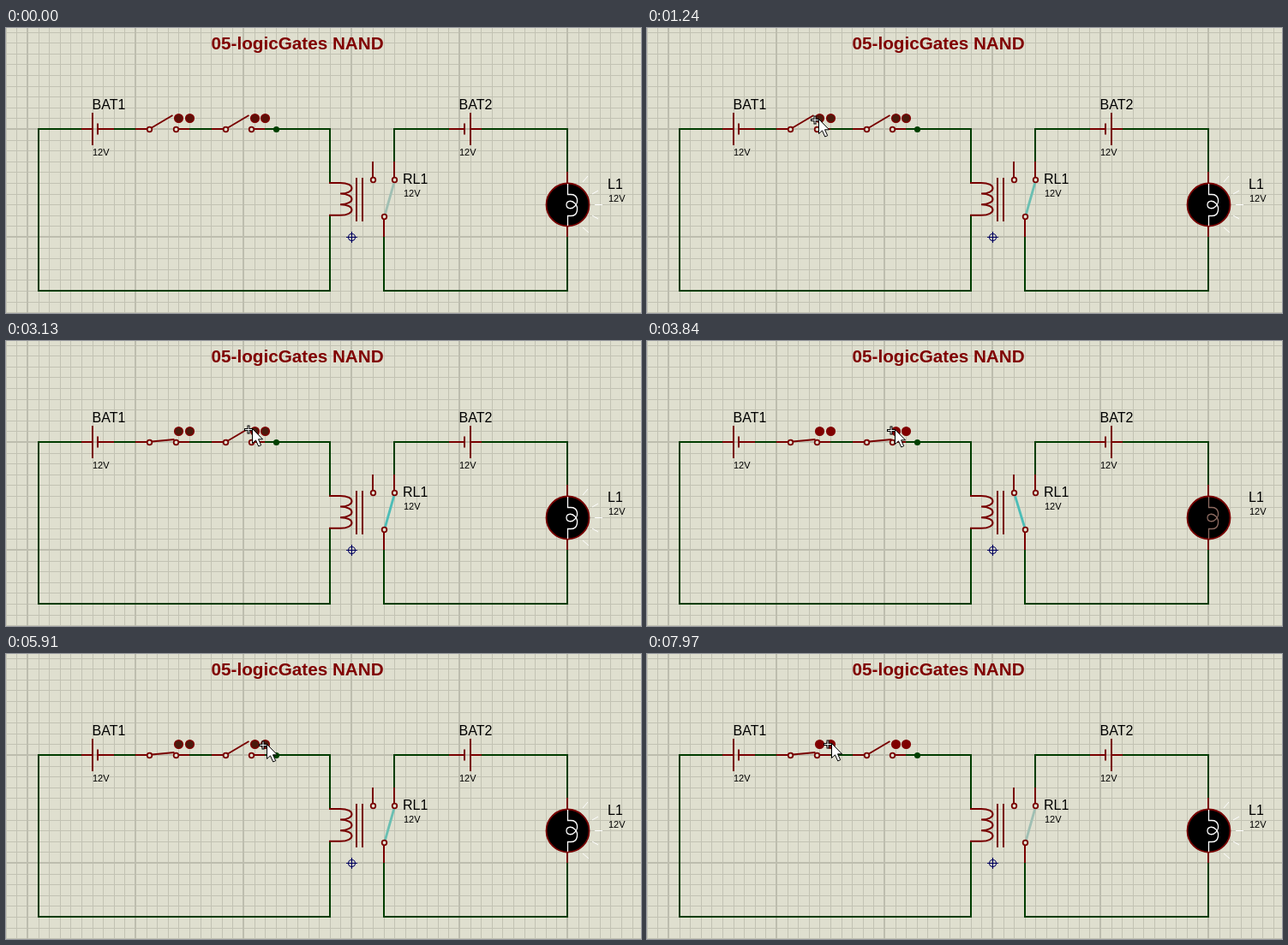
Write an HTML page that moves like this. It is 741 px wide and 333 px high and loops after 8000 ms.

```html
<!DOCTYPE html>
<html lang="en">
<head>
<meta charset="utf-8">
<title>NAND relay circuit</title>
<style>
  html, body { margin: 0; width: 100%; height: 100%; overflow: hidden; background: #dfdfcf; }
  svg { display: block; width: 741px; height: 333px; }
  text { font: 16px "Liberation Sans", Arial, sans-serif; fill: #000; }
  .small { font-size: 11px; }
  .title { font-size: 20.7px; font-weight: bold; fill: #800000; }
  .line { fill: none; stroke-width: 2; }
  .wire { stroke: #003c00; }
  .part { stroke: #780000; }
  .terminal { fill: #dfdfcf; stroke: #780000; stroke-width: 1.8; }
</style>
</head>
<body>
<svg viewBox="0 0 741 333">
  <path id="minorGrid" stroke="#c2c2b3" shape-rendering="crispEdges"/>
  <path id="majorGrid" stroke="#bdbdae" stroke-width="2" shape-rendering="crispEdges" transform="translate(-.5 -.5)"/>

  <text class="title" x="239.5" y="25">05-logicGates NAND</text>
  <text x="100.5" y="95">BAT1</text>
  <text x="528.5" y="95">BAT2</text>
  <text x="463" y="182">RL1</text>
  <text x="702" y="188">L1</text>
  <text class="small" x="101" y="149">12V</text>
  <text class="small" x="529" y="149">12V</text>
  <text class="small" x="464" y="197">12V</text>
  <text class="small" x="703" y="203">12V</text>

  <path class="line wire" d="M88 118H38V307H378V219M126 118H151M214 118H240M302 118H378V181
    M453 156V118H517M555 118H655V168M655 244V307H441V244"/>
  <circle cx="315.5" cy="118.5" r="3.6" fill="#004000"/>

  <path class="line part" d="M88 118H101M101 99V137M107 111.5V124.5M107 118H126
    M517 118H535M535 111.5V124.5M542 99V137M542 118H555"/>
  <path class="line part" d="M151 118H165M201 118H214M240 118H254M289 118H302"/>
  <circle class="terminal" cx="167.5" cy="118.5" r="2.8"/>
  <circle class="terminal" cx="198.5" cy="118.5" r="2.8"/>
  <circle class="terminal" cx="256.5" cy="118.5" r="2.8"/>
  <circle class="terminal" cx="286.5" cy="118.5" r="2.8"/>
  <path id="lever1" class="line part"/>
  <path id="lever2" class="line part"/>
  <g id="buttons" stroke="#800000" stroke-width="1.5">
    <circle cx="201.5" cy="105.5" r="4.8"/>
    <circle cx="214.5" cy="105.5" r="4.8"/>
    <circle cx="290.5" cy="105.5" r="4.8"/>
    <circle cx="302.5" cy="105.5" r="4.8"/>
  </g>

  <path class="line part" d="M377 181H390c18 0 18 12.6 0 12.6c18 0 18 12.6 0 12.6c18 0 18 12.6 0 12.6H377
    M409 175V226M416 175V226M428 156V174M453 156V174M441 223V244"/>
  <path id="arm" fill="none" stroke-width="2.8"/>
  <circle class="terminal" cx="428.5" cy="177.5" r="2.8"/>
  <circle class="terminal" cx="453.5" cy="177.5" r="2.8"/>
  <circle class="terminal" cx="441.5" cy="220.5" r="2.8"/>
  <g fill="none" stroke="#000060" stroke-width="1.1">
    <circle cx="403.5" cy="244.5" r="4"/>
    <path d="M397 244.5H410M403.5 238V251"/>
  </g>

  <path class="line part" d="M655 168V182M655 231V244"/>
  <circle class="part" cx="655.5" cy="206.5" r="25" stroke-width="1.8"/>
  <path id="filament" fill="none" stroke-width="1.3" d="M655.5 182V194.5H659C668 194.5 668 204 664 208
    C660 212.5 654 211 654 206.5C654 202 660 200.5 664 205C668 209 668 219.5 659 219.5H655.5V231"/>
  <path id="rays" stroke="#fff" stroke-width="1"
    d="M673 180L679 173M684 194L691 190M687 206.5H696M684 219L691 223M673 233L680 239"/>

  <g id="arrow">
    <path d="M-9.5 1H.5M-4.5-4V6" stroke="#000" stroke-width="3"/>
    <path d="M-8.5 1H-.5M-4.5-3V5" stroke="#fff"/>
    <path d="M0 0V17L4 13.4L7.2 20.5L10.2 19.2L7 12.3H12Z" fill="#fff" stroke="#000"/>
  </g>
  <path id="hand" fill="#fff" stroke="#000" stroke-width="1.1" d="M-2 1Q0-1 2 1V8Q4 6.5 5.5 8.5Q7.5 7.5 8.5 9.5
    Q10.5 9 10.5 11.5V17L8.5 20V23.5H-1V20L-5.5 13Q-6.5 10-4.5 10.5L-2 13Z"/>
</svg>
<script>
const LOOP = 8000;
const $ = id => document.getElementById(id);

// Grid: every tenth line is heavier, counted from the origin marker.
const CELL = 12.6, ORIGIN = { x: 403.45, y: 244.5 };
const gridPaths = { minorGrid: "", majorGrid: "" };
const addGrid = (origin, size, draw) => {
  for (let i = -Math.floor(origin / CELL); origin + i * CELL < size; i++)
    gridPaths[i % 10 ? "minorGrid" : "majorGrid"] += draw(Math.floor(origin + i * CELL) + 0.5);
};
addGrid(ORIGIN.x, 741, x => `M${x} 0V333`);
addGrid(ORIGIN.y, 333, y => `M0 ${y}H741`);
for (const id in gridPaths) $(id).setAttribute("d", gridPaths[id]);

// Pointer position: [time, x, y]
const pointerPath = [
  [130, 262, 333], [520, 222, 190], [910, 203, 112], [1240, 200, 106], [1920, 200, 106],
  [2300, 284, 100], [2380, 287, 102], [3130, 287, 102], [3590, 289, 103], [4380, 289, 103],
  [4540, 299, 104], [5410, 302, 104], [5910, 304, 105], [6170, 300, 122], [6510, 296, 122],
  [6840, 272, 114], [7060, 264, 106], [7150, 264, 106], [7800, 217, 106], [7970, 215, 104]
];
const buttonShades = [[0, "#5a1008"], [130, "#4a1a0c"], [3840, "#800000"], [4910, "#4a1a0c"], [6250, "#800000"]];
const armShades = [[0, "#a0bfb3"], [130, "#6abfb2"], [1920, "#4cbdb7"], [4910, "#6abfb2"], [6250, "#a0bfb3"]];

const stepAt = (steps, t) => steps.findLast(([start]) => t >= start)[1];

function pointerAt(t) {
  const next = pointerPath.findIndex(([time]) => time > t);
  if (next < 0) return pointerPath.at(-1).slice(1);
  const [t0, x0, y0] = pointerPath[next - 1], [t1, x1, y1] = pointerPath[next];
  const k = (t - t0) / (t1 - t0);
  return [Math.round(x0 + (x1 - x0) * k), Math.round(y0 + (y1 - y0) * k)];
}

const setLever = (id, x, closed) =>
  $(id).setAttribute("d", closed ? `M${x + 2.5} 117.5L${x + 29} 115` : `M${x + 2.5} 116.5L${x + 27} 102`);

const show = (id, visible) => $(id).setAttribute("visibility", visible ? "visible" : "hidden");

function render(t) {
  const first = t >= 1580, second = t >= 3840 && t < 5010;
  const energised = first && second;
  setLever("lever1", 167.5, first);
  setLever("lever2", 256.5, second);
  $("buttons").setAttribute("fill", stepAt(buttonShades, t));
  $("arm").setAttribute("d", energised ? "M441 219L429.5 181" : "M442 219L453 180");
  $("arm").setAttribute("stroke", stepAt(armShades, t));
  $("filament").setAttribute("stroke", energised ? "#8c6a60" : "#fff");
  show("rays", !energised);

  const hasPointer = t >= 130, hovering = t >= 6840 && t < 7300;
  show("arrow", hasPointer && !hovering);
  show("hand", hovering);
  if (hasPointer) $(hovering ? "hand" : "arrow").setAttribute("transform", `translate(${pointerAt(t).map(v => v + 0.5)})`);
}

const begin = performance.now();
function tick() {
  render((performance.now() - begin) % LOOP);
  requestAnimationFrame(tick);
}
tick();
</script>
</body>
</html>
```
